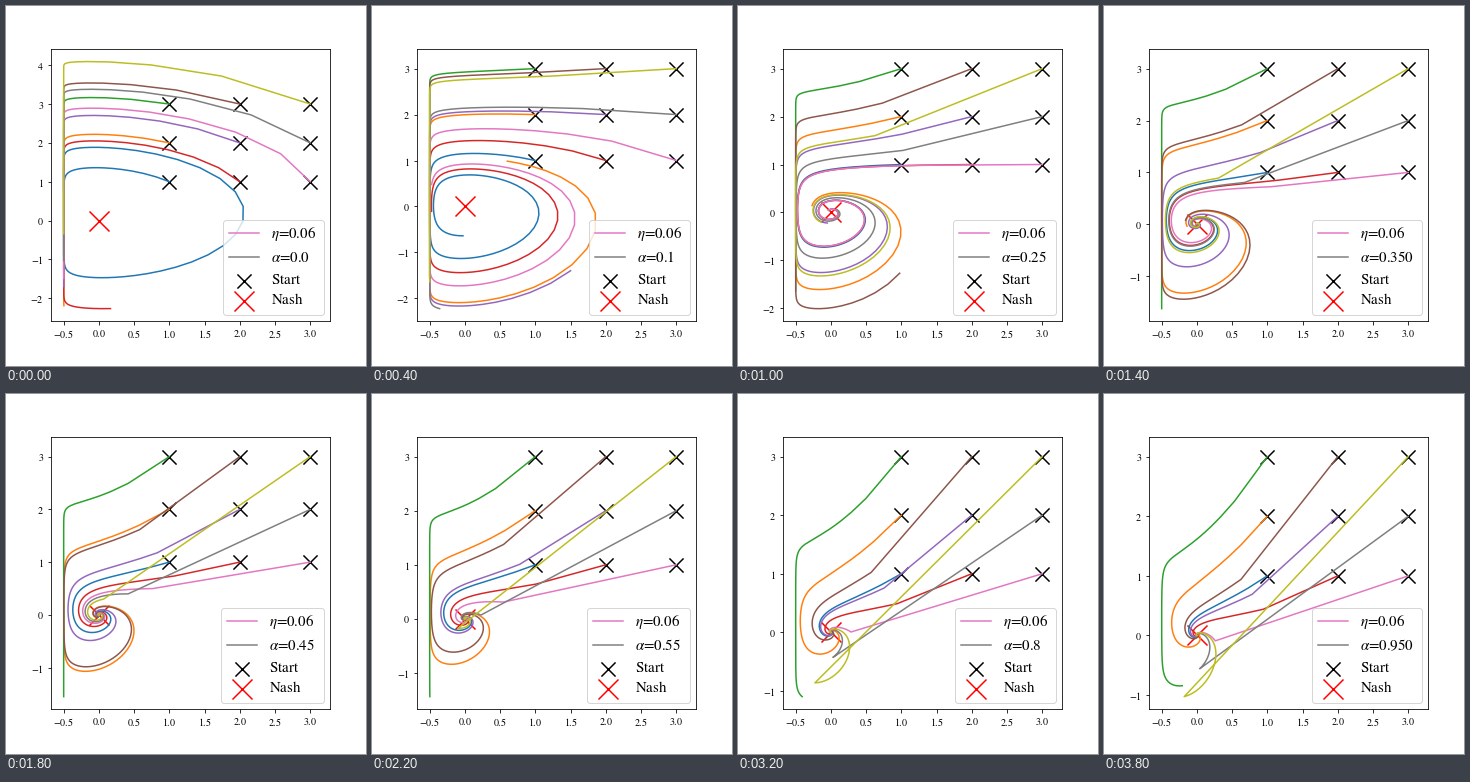
A matplotlib script that plays this animation: 360x360 px, repeating every 4000 ms.

```python
import numpy as np
import matplotlib.pyplot as plt
from matplotlib.animation import FuncAnimation
from matplotlib.patches import FancyBboxPatch
from matplotlib.ticker import MultipleLocator

plt.rcParams.update({"font.family": "Liberation Serif", "mathtext.fontset": "stix"})

SIZE = 360
ETA = 0.06
STEPS = 300
FRAMES = 20
STARTS = np.array([(x, y) for x in (1, 2, 3) for y in (1, 2, 3)], float)
START_AREA, NASH_AREA = 200, 400


def descend(alpha):
    """Adjusted gradient play on f(x, y) = y (x^2 + x), x minimises, y maximises."""
    x, y = STARTS.T.copy()
    path = [(x, y)]
    rate = ETA / (1 + alpha**2)
    for _ in range(STEPS):
        mixed = 2 * x + 1
        gx, gy = y * mixed, -(x**2 + x)
        x, y = (x - rate * (gx - alpha * mixed * gy),
                y - rate * (gy + alpha * mixed * gx))
        path.append((x, y))
    return np.array(path)


def limits(values, pixels):
    """Data range plus 5 % margin, leaving room for the start markers."""
    lo, hi = values.min(), values.max()
    half = np.sqrt(START_AREA) / 2
    scale = (pixels / 1.1 - half) / (3 - lo)
    hi = max(hi, 3 + half / scale)
    margin = 0.05 * (hi - lo)
    return lo - margin, hi + margin


def cross(axes, x, y, area, color):
    axes.scatter(x, y, s=area, marker="x", color=color, linewidths=1.5)


def equation(symbol, value):
    gap = r"\hspace{-0.2}"
    return rf"$\{symbol}{gap}={gap}{value}$"


def draw_plot(path):
    ax.clear()
    xs, ys = path[:, 0], path[:, 1]
    for k in range(len(STARTS)):
        ax.plot(xs[:, k], ys[:, k], color=f"C{k}", lw=1.5)
    cross(ax, *STARTS.T, START_AREA, "black")
    cross(ax, 0, 0, NASH_AREA, "red")
    ax.set_xlim(limits(xs, 0.775 * SIZE))
    ax.set_ylim(limits(ys, 0.755 * SIZE))
    ax.xaxis.set_major_locator(MultipleLocator(0.5))
    ax.yaxis.set_major_locator(MultipleLocator(1))
    ax.xaxis.set_major_formatter("${x:.1f}$")
    ax.yaxis.set_major_formatter("${x:.0f}$")


def draw_legend(value):
    top.clear()
    top.set(xlim=(0, SIZE), ylim=(SIZE, 0))
    top.axis("off")
    decimals = len(value) - 2
    left = min(217.4, 230.4 - 7.5 * decimals)
    right, upper, lower = 317.5, 213.5, 308.5
    top.add_patch(FancyBboxPatch(
        (left, upper), right - left, lower - upper,
        boxstyle="round,pad=0,rounding_size=3", snap=True,
        facecolor="white", edgecolor="0.8", linewidth=1, alpha=0.8))
    rows = [(equation("eta", ETA), 232), (equation("alpha", value), 256),
            (r"$\mathrm{Start}$", 278.5), (r"$\mathrm{Nash}$", 298.5)]
    for label, base in rows:
        top.text(left + 48, base, label, size=15, va="baseline")
    for color, (_, base) in zip(("C6", "C7"), rows):
        top.plot([left + 6, left + 36], [base - 5.25] * 2, color=color, lw=1.5)
    cross(top, left + 21, rows[2][1] - 4, START_AREA, "black")
    cross(top, left + 21, rows[3][1] - 4, NASH_AREA, "red")


def update(i):
    alpha = i * 0.05
    draw_plot(descend(alpha))
    draw_legend(str(alpha)[:5])
    return []


fig = plt.figure(figsize=(5, 5), dpi=72, facecolor="white")
ax = fig.add_axes([0.125, 0.125, 0.775, 0.755])
top = fig.add_axes([0, 0, 1, 1])

anim = FuncAnimation(fig, update, frames=FRAMES, interval=200,
                     repeat=True, repeat_delay=0, blit=False)
plt.show()
```
